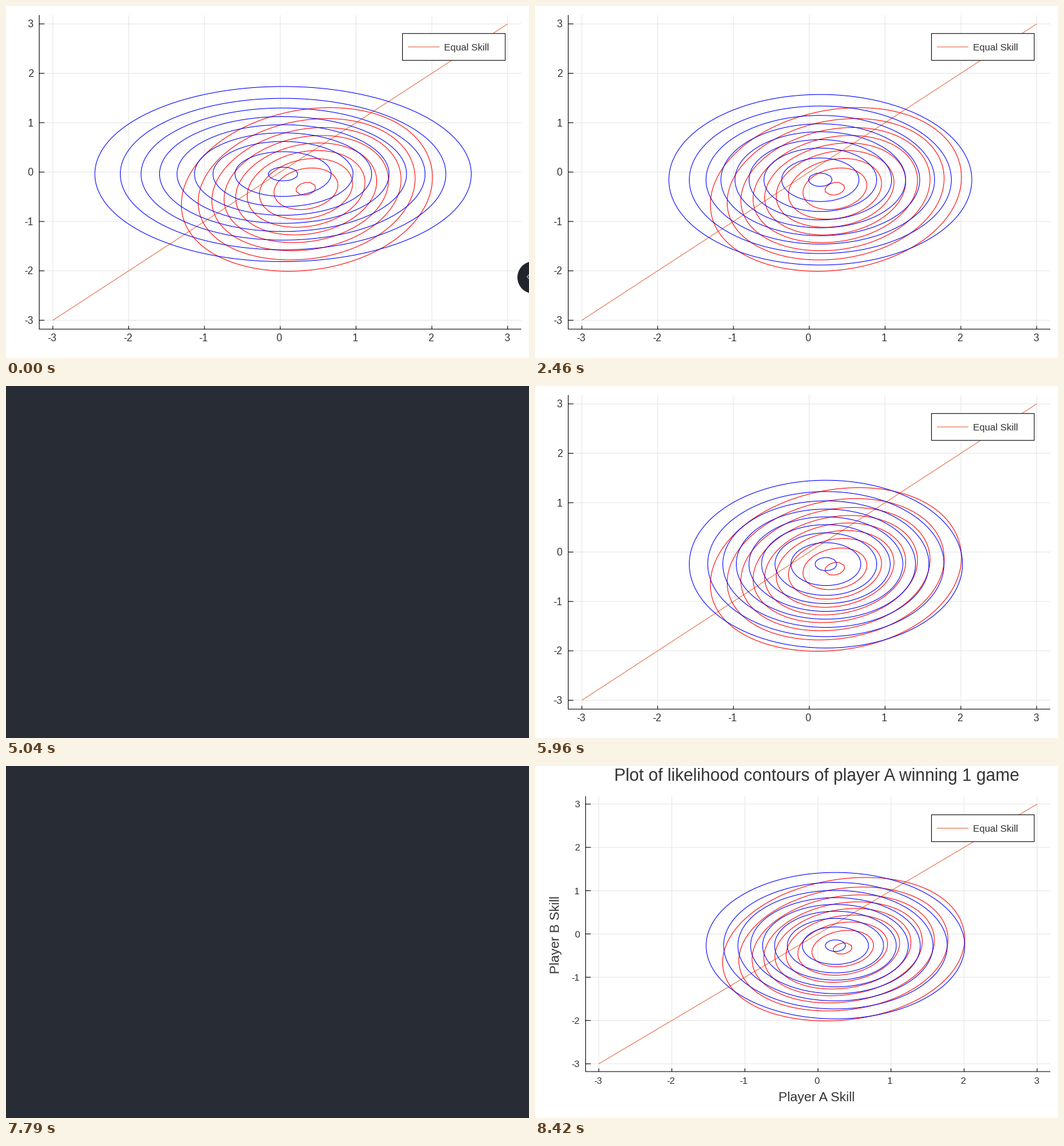
Recreate the animation shown at these times as a matplotlib script. Size 812 by 546 pixels, loop 8.97 s.

```python
import numpy as np
import matplotlib.pyplot as plt
from matplotlib.animation import FuncAnimation
from matplotlib.patches import Circle, Rectangle

W, H, DPI = 812, 546, 64
LOOP, STEP = 8970, 15
PX = 72 / DPI  # points per pixel
INK, GRID, ORANGE, BACK = "#333333", "#e6e6e6", "#e26f46", "#282c34"
RIGHT, SPAN = 800, 6.36  # plot edge in pixels, axis range with padding

plt.rcParams["font.family"] = "Liberation Sans"
fig = plt.figure(figsize=(W / DPI, H / DPI), dpi=DPI, facecolor="white")
ax = fig.add_axes([0, 0, 1, 1])
ax.set_axis_off()

skill = np.linspace(-3, 3, 100)
A, B = np.meshgrid(skill, skill)
LEVELS = np.append(np.arange(2, 10) / 10, 0.99)

# When each new plot appears; some are preceded by a blank pane
STARTS = [0, 840, *range(1600, 4181, 860), 5120, 5960, 6990, 7870, 8420]
FLASHING = (1, 6, 8, 9, 10)
BLANK = 85
LAST = len(STARTS) - 1


def posterior():
    return np.exp(-(A**2 + B**2) / 2) / (1 + np.exp(B - A))


def fit(k):
    """Gaussian after k optimiser steps, each parameter settling exponentially."""
    mean_a = 0.28 - 0.243 * 0.82**k
    mean_b = -0.34 + 0.30 * 0.85**k
    sd_a = 0.968 + 0.416 * 0.705**k
    sd_b = 0.935 + 0.053 * 0.80**k
    return np.exp(-(((A - mean_a) / sd_a) ** 2 + ((B - mean_b) / sd_b) ** 2) / 2)


class Panel:
    """One plot layout, in stage pixels with y pointing down."""

    def __init__(self, left, top, bottom, font, label_y, legend_y):
        self.origin = (left + RIGHT) / 2, (top + bottom) / 2
        self.unit = (RIGHT - left) / SPAN, (bottom - top) / SPAN
        self.parts = []
        for v in range(-3, 4):
            x, y = self.place(v, v)
            self.line([x, x], [top, bottom], GRID, 1)
            self.line([left, RIGHT], [y, y], GRID, 1)
            self.line([x, x], [bottom, bottom - 5], "black", 4)
            self.line([left, left + 8], [y, y], "black", 4)
            self.text(x - 1.5, label_y + 0.35 * font, str(v), font)
            self.text(left - 9, y + 0.35 * font, str(v), font, ha="right")
        self.line([left, left, RIGHT], [top, bottom, bottom], "black", 4)
        ends = np.array([-3, 3])
        self.line(*self.place(ends, ends), ORANGE, 2)
        self.parts.append(self.contours(posterior(), "red"))
        self.legend(legend_y)

    def place(self, a, b):
        return self.origin[0] + self.unit[0] * a, self.origin[1] - self.unit[1] * b

    def line(self, xs, ys, color, z):
        self.parts += ax.plot(xs, ys, color=color, lw=PX, zorder=z, snap=False,
                              solid_capstyle="butt", solid_joinstyle="miter")

    def text(self, x, y, s, size, ha="center", **kw):
        self.parts.append(ax.text(x, y, s, size=size * PX, ha=ha, va="baseline",
                                  color=INK, zorder=7, **kw))

    def contours(self, z, color):
        x, y = self.place(A, B)
        return ax.contour(x, y, z, levels=LEVELS * z.max(), colors=color,
                          linewidths=PX, zorder=3)

    def legend(self, y):
        self.parts.append(ax.add_patch(Rectangle(
            (615.6, y - 20.8), 159.5, 41.6, fc="white", ec="black", lw=PX,
            zorder=5, snap=False)))
        self.line([624, 673], [y, y], ORANGE, 6)
        self.text(680, y + 5.3, "Equal Skill", 15, ha="left")

    def show(self, on):
        for part in self.parts:
            part.set_visible(on)


plain = Panel(left=51.6, top=14, bottom=501.2, font=15.8, label_y=514.5, legend_y=63.5)
labelled = Panel(left=78.6, top=47, bottom=474, font=14.7, label_y=488, legend_y=96.5)
labelled.text(437, 23, "Plot of likelihood contours of player A winning 1 game", 26.6)
labelled.text(437.5, 519.5, "Player A Skill", 20.5)
labelled.text(38, 261.5, "Player B Skill", 20.5, rotation=90, rotation_mode="anchor")

# The labelled plot repeats the last fit
fits = [plain.contours(fit(k), "blue") for k in range(LAST)]
fits.append(labelled.contours(fit(LAST - 1), "blue"))

# Dock button leaving at the right edge
button = ax.add_patch(Circle((819, 421), 25, fc="#21252b", lw=0, zorder=8))
chevron, = ax.plot([], [], color="#9da5b4", lw=1.5 * PX, zorder=9)
blank = ax.add_patch(Rectangle((-1, -1), W + 2, H + 2, fc=BACK, lw=0, zorder=10))

ax.set_xlim(0, W)
ax.set_ylim(H, 0)


def draw_button(t):
    shift = 18 * np.ceil(np.clip((t - 139) / 75, 0, 3)) / 3
    button.set_center((819 + shift, 421))
    chevron.set_data(np.array([813, 809, 813]) + shift, [416, 420, 424])


def update(i):
    t = i * STEP + 10
    dark = any(STARTS[k] - BLANK <= t < STARTS[k] for k in FLASHING)
    step = sum(t >= s for s in STARTS) - 1
    blank.set_visible(dark)
    plain.show(not dark and step < LAST)
    labelled.show(step == LAST)
    for k, curves in enumerate(fits):
        curves.set_visible(k == step and not dark)
    draw_button(t)
    return []


anim = FuncAnimation(fig, update, frames=LOOP // STEP, interval=STEP,
                     init_func=lambda: update(0), repeat=True, repeat_delay=0)
plt.show()
```
